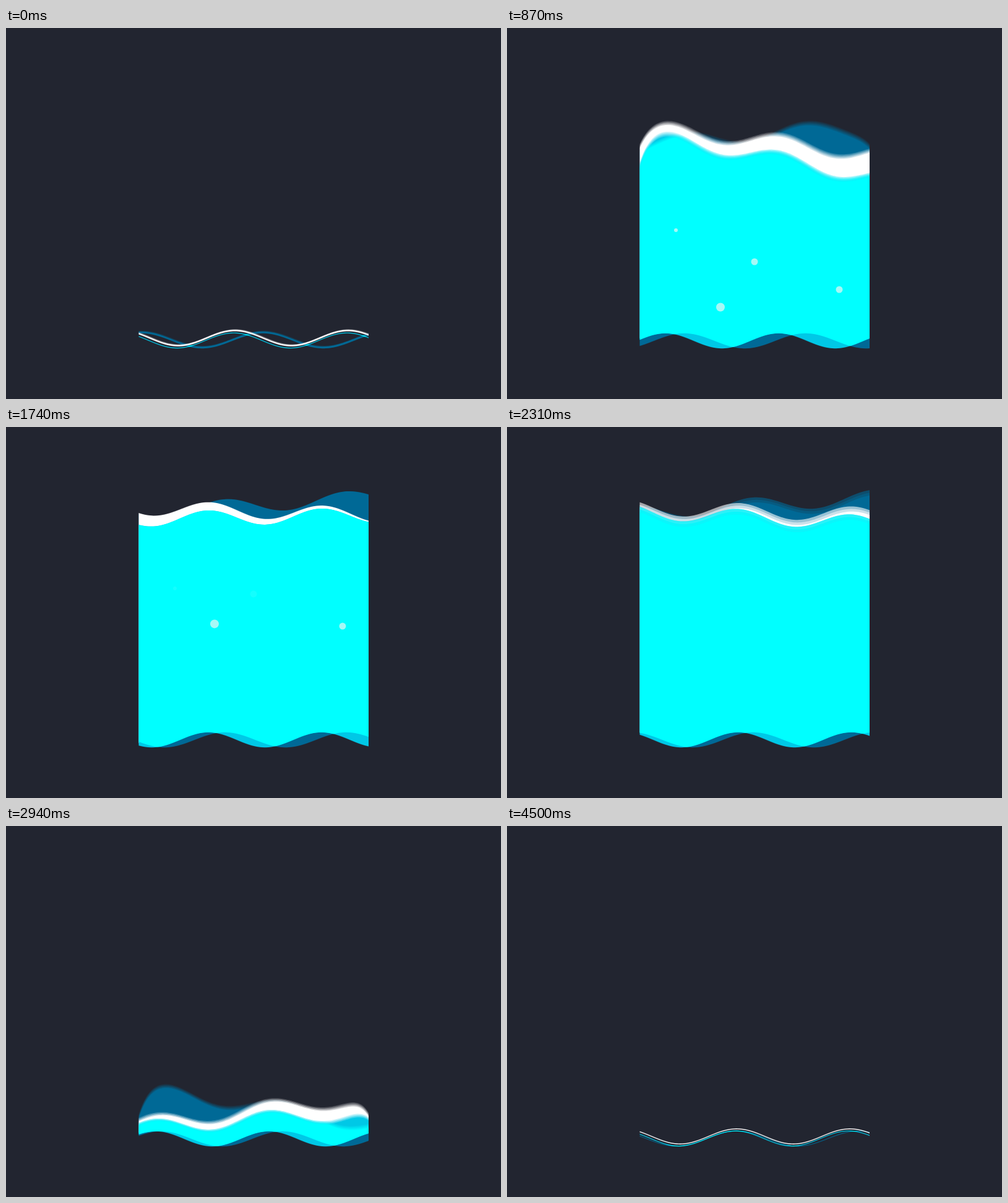
An HTML page with a canvas that plays this animation: 800 px wide and 600 px high, repeating every 4.53 s.

```html
<!DOCTYPE html>
<html lang="en">
<head>
<meta charset="utf-8">
<title>Liquid wave</title>
<style>
  html, body { margin: 0; width: 100%; height: 100%; overflow: hidden; background: #222530; }
  canvas { display: block; width: 800px; height: 600px; }
</style>
</head>
<body>
<canvas id="stage" width="800" height="600"></canvas>
<script>
const LOOP = 4530, STEP = 30, LEFT = 214.5, RIGHT = 586, AMP = 12.2;
const MID = (LEFT + RIGHT) / 2, HALF = (RIGHT - LEFT) / 2;
const SAMPLES = 5, SHUTTER = 22, CORNER = 18;
const BG = '#222530', BLUE = '#006b96', DIM = '#00c8e8', CYAN = '#00ffff';
const FALL_START = 2310;

// rest / full: surface level when empty and full; tilt / sway: slope when full.
// rise / fall: while moving, lean tips the surface and droop rounds its leading corner.
const blue = {
  crest: 219, speed: .0775, length: 196, floor: 506, rest: 505, full: 126, tilt: -12, sway: 0,
  rise: { start: -60, time: 1208, lean: -10, droop: 38 },
  fall: { start: FALL_START, time: 1010, lean: 41, droop: 68 }
};
const white = {
  crest: 187, speed: .0816, length: 183, floor: 502.7, rest: 501.3, full: 136, tilt: 5.5, sway: 0,
  rise: { start: -45, time: 1180, lean: 30, droop: 60 },
  fall: { start: FALL_START, time: 955, lean: -30, droop: 50 }
};
const cyan = {
  crest: 185, speed: .0816, length: 183, floor: 506, rest: 504.7, full: 146, tilt: 3, sway: 6,
  rise: { start: 0, time: 1190, lean: 54, droop: 86 },
  fall: { start: FALL_START, time: 880, lean: -19, droop: 29 }
};

// Position at 870 ms, speed in px per ms, and when the fade-out begins and ends.
const bubbles = [
  { x: 273, y: 327, r: 3, vx: 0, vy: -.076, out: [1450, 1780] },
  { x: 400, y: 378, r: 5.5, vx: 0, vy: -.124, out: [1450, 1780] },
  { x: 345, y: 451.5, r: 7, vx: -.0092, vy: -.153, out: [1800, 2200] },
  { x: 537, y: 423, r: 5.5, vx: .008, vy: -.116, out: [1800, 2200] }
];

const ctx = document.getElementById('stage').getContext('2d');
const bufA = buffer(), bufB = buffer();

const clamp01 = v => Math.min(1, Math.max(0, v));
const easeInOut = p => .5 - .5 * Math.cos(Math.PI * p);
const easeOut = p => 1 - (1 - p) ** 2;

function buffer() {
  const c = document.createElement('canvas');
  c.width = 800;
  c.height = 600;
  return c.getContext('2d');
}

// Progress of a move, and the surge that swells and dies with it.
function phase(move, t, ease) {
  const p = clamp01((t - move.start) / move.time), done = ease(p);
  return { done, surge: done * Math.sin(Math.PI * p) };
}

function bend(move, surge, x) {
  const edge = move.lean > 0 ? x - LEFT : RIGHT - x;
  return surge * (move.lean * (x - MID) / HALF + move.droop * Math.exp(-edge / CORNER));
}

function surface(l, t) {
  const up = phase(l.rise, t, easeInOut), down = phase(l.fall, t, easeOut);
  const filled = up.done - down.done;
  const tilt = l.tilt + l.sway * Math.sin(2 * Math.PI * (t - 2025) / 1140);
  return x => Math.min(l.rest,
    l.rest + filled * (l.full - l.rest + tilt * (x - MID) / HALF)
    + bend(l.rise, up.surge, x) + bend(l.fall, down.surge, x));
}

function trace(g, l, t) {
  const top = surface(l, t), crest = l.crest + l.speed * t;
  const wave = x => -AMP * Math.cos(2 * Math.PI * (x - crest) / l.length);
  g.beginPath();
  for (let x = LEFT; x < RIGHT + 3; x += 3) {
    const px = Math.min(x, RIGHT);
    g.lineTo(px, top(px) + wave(px));
  }
  for (let x = RIGHT; x > LEFT - 3; x -= 3) {
    const px = Math.max(x, LEFT);
    g.lineTo(px, l.floor + wave(px));
  }
  g.closePath();
}

// Average several moments for motion blur.
function render(g, l, t, color) {
  g.globalCompositeOperation = 'source-over';
  g.clearRect(0, 0, 800, 600);
  g.globalCompositeOperation = 'lighter';
  g.globalAlpha = 1 / SAMPLES;
  g.fillStyle = color;
  for (let k = 0; k < SAMPLES; k++) {
    trace(g, l, t + (k / (SAMPLES - 1) - .5) * SHUTTER);
    g.fill();
  }
  g.globalAlpha = 1;
  return g.canvas;
}

function drawBubbles(t) {
  ctx.fillStyle = '#a6f8f6';
  for (const b of bubbles) {
    const dt = t - 870, [from, to] = b.out;
    ctx.globalAlpha = clamp01((t - 620) / 160) * clamp01((to - t) / (to - from));
    ctx.beginPath();
    ctx.arc(b.x + b.vx * dt, b.y + b.vy * dt, b.r, 0, 2 * Math.PI);
    ctx.fill();
  }
  ctx.globalAlpha = 1;
}

function draw(t) {
  ctx.fillStyle = BG;
  ctx.fillRect(0, 0, 800, 600);
  ctx.drawImage(render(bufA, blue, t, BLUE), 0, 0);
  ctx.drawImage(render(bufB, white, t, '#fff'), 0, 0);
  ctx.drawImage(render(bufB, cyan, t, DIM), 0, 0);
  // Cyan is brightest where it overlaps blue.
  render(bufB, cyan, t, CYAN);
  bufB.globalCompositeOperation = 'destination-in';
  bufB.drawImage(bufA.canvas, 0, 0);
  ctx.drawImage(bufB.canvas, 0, 0);
  drawBubbles(t);
}

const start = performance.now();
let shown = -1;
function tick() {
  const step = Math.floor((performance.now() - start) % LOOP / STEP);
  const t = step < 2 ? 0 : step * STEP;
  if (t !== shown) draw(shown = t);
  requestAnimationFrame(tick);
}
tick();
</script>
</body>
</html>
```
